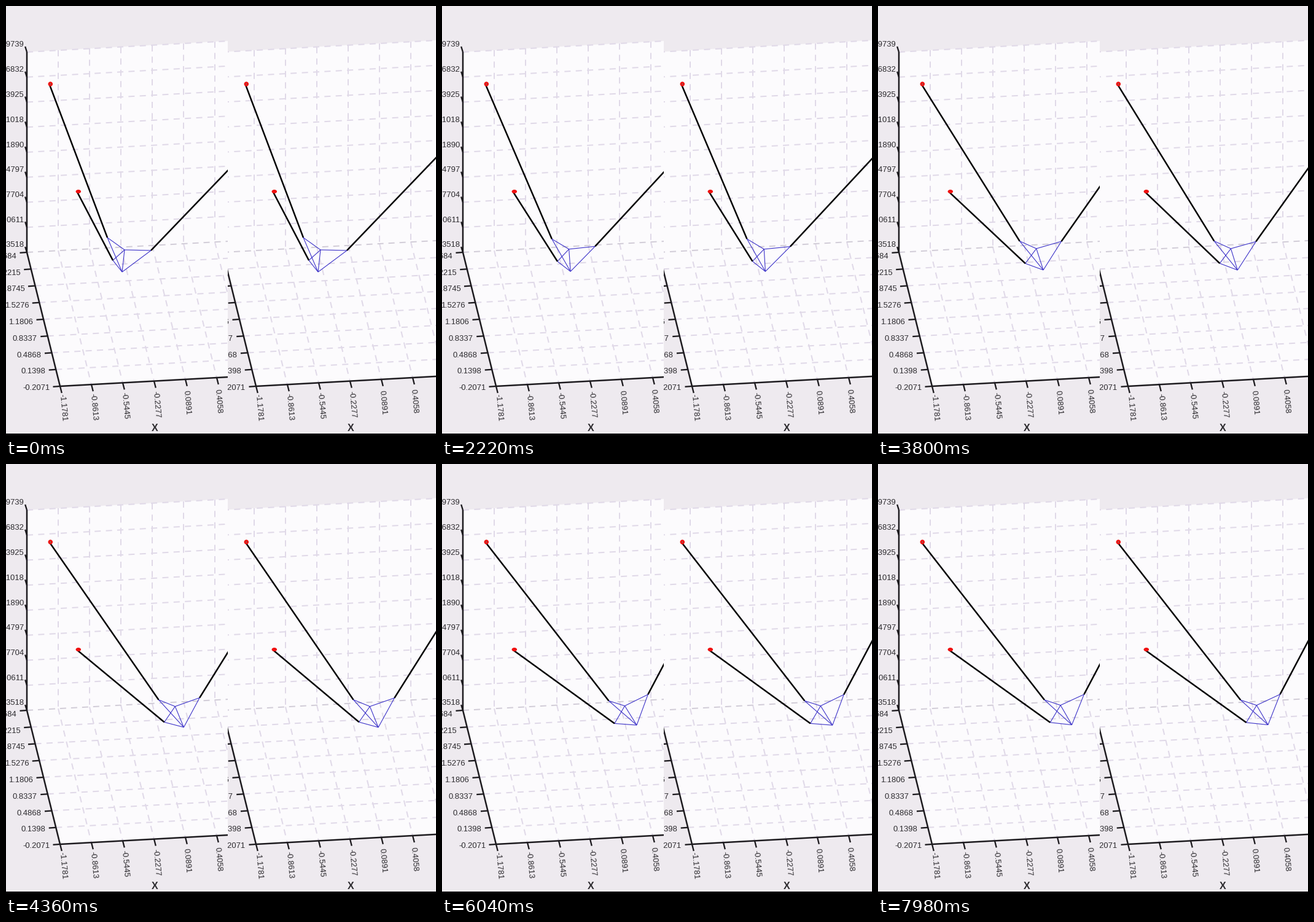
Animation, 700 px wide and 700 px high, one loop 8 s. Source, as a matplotlib script:

```python
import numpy as np
import matplotlib.pyplot as plt
from matplotlib.animation import FuncAnimation
from matplotlib.collections import LineCollection
from matplotlib.patches import Ellipse, Polygon

SIZE, DPI = 700, 100
PX = 72 / DPI
TICK = 20            # ms per drawn frame
LOOP = 8000

PAPER, SHEET = "#eeeaef", "#fcfbfd"
AXIS, INK = "#1c1a1e", "#2e2c30"
GRID, SEAM = "#e0d9e8", "#d2cdd8"
BLUE, RED = "#3a30c8", "#f01010"

# Room: corner point and the step per tick along x, y and z
CORNER = np.array([34.0, 401.0])
STEP_X = np.array([51.0, -2.8])
STEP_Y = np.array([6.75, 27.25])
STEP_Z = np.array([0.0, -40.75])
FAR = 7.2

# Moving frame: arms from the hub (three leg ends and the lower tip),
# as complex offsets at both ends of the tilt
ANCHORS = np.array([[70.5, 127], [116, 303], [430, 196]])
ARMS = np.array([-28 - 20j, -19 + 17j, 43 + 1j, -4 + 36j])
TURNED = np.array([-26 - 8j, -16.5 + 29j, 37.5 - 19j, 20 + 31j])
HUB, TIP = 4, 3
EDGES = [(HUB, i) for i in range(4)] + [(TIP, i) for i in range(3)]
SWING = 149          # steps from one end of the swing to the other
LAG = 1.5            # the right view trails a little


def ease(n):
    return (1 - np.cos(np.pi * n / SWING)) / 2


def smooth(u):
    return u * u * (3 - 2 * u)


def pose(n):
    n = max(n, 0)
    hub = 193 + 105 * smooth(ease(n)) + 1j * (397 - 0.025 * n)
    arms = ARMS * (TURNED / ARMS) ** ease(n + 4)
    points = np.append(hub + arms, hub)
    return np.column_stack([points.real, points.imag])


def step_index(ms):
    """Uneven playback: three steps per 140 ms, held 20, 100 and 20 ms."""
    cycle, rest = divmod(ms, 140)
    return 3 * cycle + (rest >= 20) + (rest >= 120)


def add_lines(ax, segs, color, width, z, dash="solid"):
    lines = LineCollection(segs, colors=color, linewidths=width * PX,
                           linestyles=[dash], zorder=z, capstyle="butt")
    ax.add_collection(lines, autolim=False)
    return lines


def label(ax, x, y, text, size=13, **kw):
    ax.text(x, y, text, fontsize=size * PX, family="Liberation Sans",
            color=INK, clip_on=True, zorder=4, **kw)


def draw_room(ax):
    top, front = CORNER + 8 * STEP_Z, CORNER + 8 * STEP_Y
    far = FAR * STEP_X
    for a in (top, front):
        ax.add_patch(Polygon([a, a + far, CORNER + far, CORNER],
                             fc=SHEET, ec=SHEET, lw=0.5, zorder=1))

    rows = [CORNER + i * s for s in (STEP_Z, STEP_Y) for i in range(1, 9)]
    grid = [(p, p + far) for p in rows[:-1]]
    for i in range(1, 8):
        p = CORNER + i * STEP_X
        grid += [(p + 8 * STEP_Z, p), (p, p + 8 * STEP_Y)]
    add_lines(ax, grid, GRID, 2, 2, (0, (5, 4.2)))
    add_lines(ax, [(CORNER, CORNER + far)], SEAM, 2, 2, (0, (5, 4)))

    add_lines(ax, [(top, CORNER), (CORNER, front), (front, front + far)],
              AXIS, 2.5, 3)
    ticks = []
    for i in range(9):
        z, y, x = CORNER + i * STEP_Z, CORNER + i * STEP_Y, front + i * STEP_X
        ticks += [(z, z + (-2.8, -9)), (y, y + (-11.5, 0.8)),
                  (x, x + (2.8, 11))]
    add_lines(ax, ticks, AXIS, 2.3, 3)

    for i in range(9):
        label(ax, 29.5, 62 + 40.75 * i, f"{0.9739 - 0.290713 * i:.4f}",
              ha="right", va="center_baseline")
        label(ax, 71 - 6.75 * i, 620.5 - 26.75 * i,
              f"{-0.20712 + 0.34694 * i:.4f}",
              ha="right", va="center_baseline")
    for i in range(6):
        label(ax, 91.5 + 50.7 * i, 632 - 1.7 * i,
              f"{-1.1781 + 0.316788 * i:.4f}", rotation=-85,
              rotation_mode="anchor", ha="left", va="center_baseline")
    label(ax, 242, 691.5, "X", 16, weight="bold", ha="center", va="baseline")

    for x, y, w, h in ((72.3, 127, 7.5, 7.5), (117.8, 302, 8.5, 6)):
        ax.add_patch(Ellipse((x, y), w, h, fc=RED, ec="none", zorder=7))
    ax.add_patch(Ellipse((72.3, 127), 2.6, 2.6, fc="#a85048", ec="none",
                         zorder=8))
    ax.axhspan(696.3, SIZE, color="black", lw=0, zorder=9)


class View:
    def __init__(self, fig, left, right, start, lag):
        ax = fig.add_axes([left / SIZE, 0, (right - left) / SIZE, 1])
        ax.set_xlim(start, start + right - left)
        ax.set_ylim(SIZE, 0)
        ax.axis("off")
        draw_room(ax)
        self.lag = lag
        self.frame = add_lines(ax, [], BLUE, 1.1, 5)
        self.legs = add_lines(ax, [], "black", 2.5, 6)

    def show(self, n):
        p = pose(n - self.lag)
        self.frame.set_segments([p[list(e)] for e in EDGES])
        self.legs.set_segments(list(zip(ANCHORS, p[:3])))


fig = plt.figure(figsize=(SIZE / DPI, SIZE / DPI), dpi=DPI, facecolor=PAPER)
views = [View(fig, 0, 361, 0, 0), View(fig, 361, 700, 42, LAG)]


def update(k):
    n = step_index(k * TICK)
    for view in views:
        view.show(n)
    return []


anim = FuncAnimation(fig, update, frames=LOOP // TICK, interval=TICK,
                     repeat=True, repeat_delay=0)
plt.show()
```
